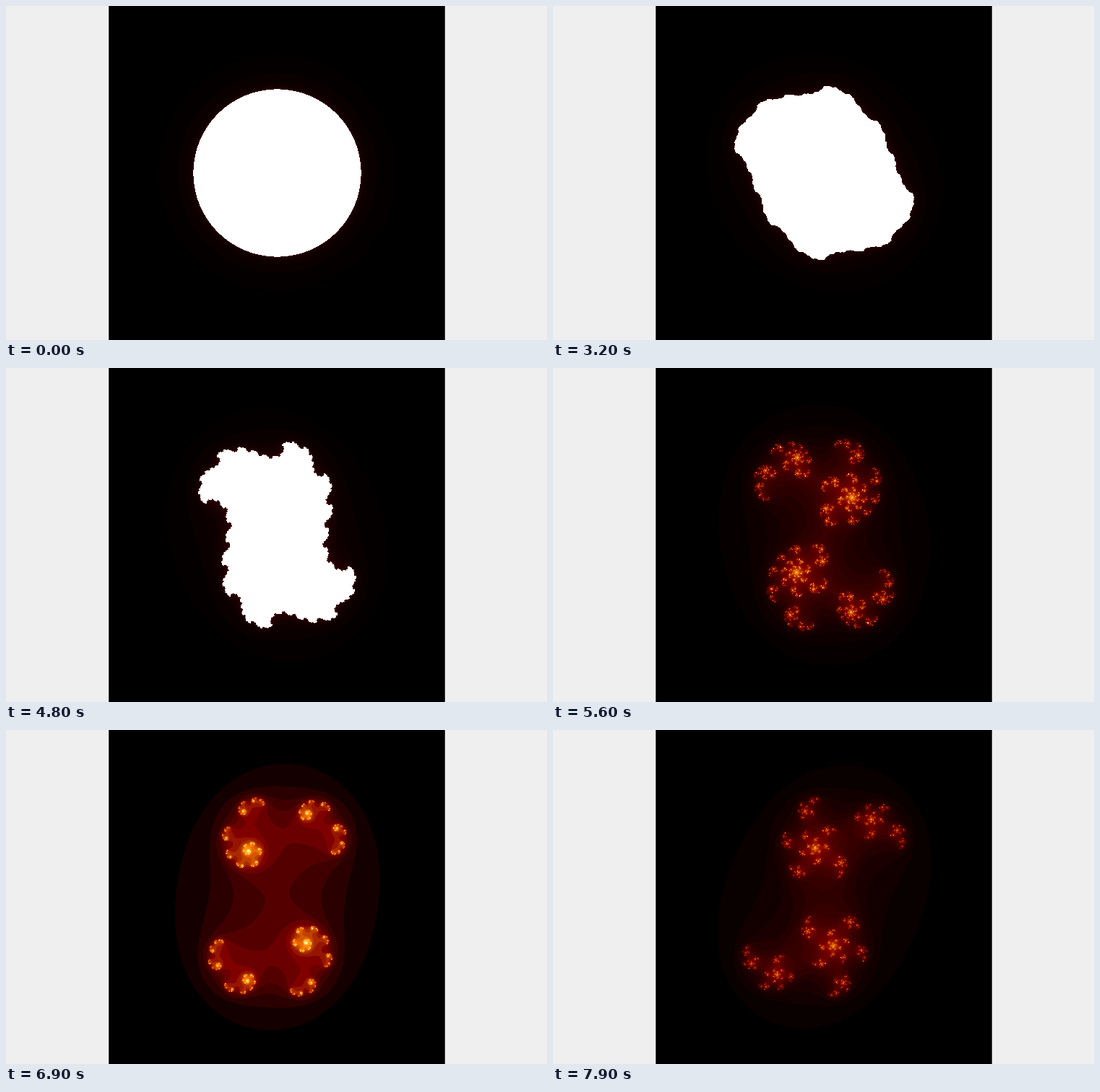
Recreate the animation shown at these times as an HTML page with a canvas. Size 749 px wide and 463 px high, loop 8000 ms.

```html
<!DOCTYPE html>
<html lang="en">
<head>
<meta charset="utf-8">
<title>Julia set spiral</title>
<style>
  html, body { margin: 0; width: 100%; height: 100%; overflow: hidden; background: #efefef; }
  canvas { position: absolute; left: 143px; top: 0; display: block; }
  /* Soft edges of the plot */
  .edges {
    position: absolute; left: 142px; top: 0; width: 464px; height: 100%;
    border: solid; border-width: 0 1px; border-color: #b4b4b4 #3c3c3c;
  }
</style>
</head>
<body>
<canvas id="plot" width="465" height="463"></canvas>
<div class="edges"></div>
<script>
const STEP_MS = 100;
const STEPS = 80;
const SCALE = 116.1;      // pixels per unit of the complex plane
const MAX_ITER = 100;
const RADIUS_STEP = 0.008;
const ANGLE_STEP = 0.05;

const canvas = document.getElementById('plot');
const ctx = canvas.getContext('2d');
const { width, height } = canvas;
const total = width * height;
const image = ctx.createImageData(width, height);
const pixels = new Uint32Array(image.data.buffer);
const counts = new Uint16Array(total);
const palette = new Uint32Array(MAX_ITER + 1);

// The parameter c spirals out from zero.
function paramAt(step) {
  const r = RADIUS_STEP * step;
  const angle = Math.PI - ANGLE_STEP * step;
  return [r * Math.cos(angle), r * Math.sin(angle)];
}

function escapeCount(x, y, cx, cy) {
  for (let n = 0; n < MAX_ITER; n++) {
    const nx = x * x - y * y + cx;
    y = 2 * x * y + cy;
    x = nx;
    if (x * x + y * y > 4) return n;
  }
  return MAX_ITER;
}

// Black, red, orange, white ramp.
function heat(v) {
  const byte = u => Math.round(255 * Math.min(1, Math.max(0, u)));
  const red = byte(2 * v);
  const green = byte(2 * v - 0.5);
  const blue = byte(2 * v - 1);
  return (0xff000000 | blue << 16 | green << 8 | red) >>> 0;
}

function draw(step) {
  const [cx, cy] = paramAt(step);
  const half = Math.ceil(total / 2);
  let peak = 1;
  // The set is symmetric about its centre, so half of it is enough.
  for (let i = 0; i < half; i++) {
    const x = (i % width - (width - 1) / 2) / SCALE;
    const y = ((height - 1) / 2 - Math.floor(i / width)) / SCALE;
    const n = escapeCount(x, y, cx, cy);
    counts[i] = n;
    if (n > peak) peak = n;
  }
  // Brightness is relative to the highest count in view.
  for (let n = 0; n <= peak; n++) palette[n] = heat(n / peak);
  for (let i = 0; i < half; i++) {
    pixels[i] = pixels[total - 1 - i] = palette[counts[i]];
  }
  ctx.putImageData(image, 0, 0);
}

const start = performance.now();
let shown = -1;

function tick(now) {
  const elapsed = Math.max(0, now - start);
  const step = Math.floor(elapsed / STEP_MS) % STEPS;
  if (step !== shown) {
    shown = step;
    draw(step);
  }
  requestAnimationFrame(tick);
}
tick(start);
</script>
</body>
</html>
```
